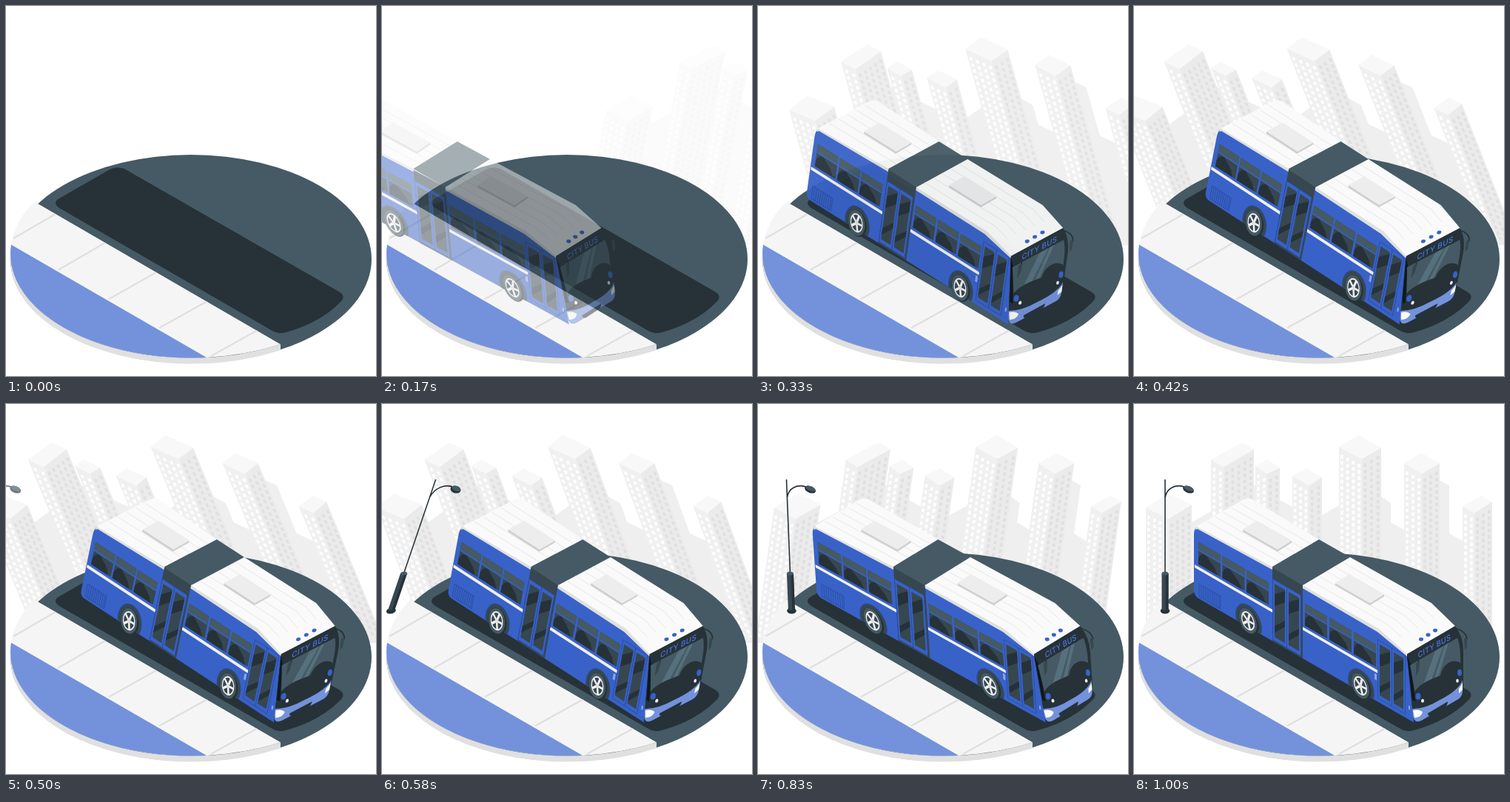
Recreate the animation shown at these times as an HTML page. Size 500 px wide and 500 px high, loop 1.04 s.

```html
<!DOCTYPE html>
<html lang="en">
<head>
<meta charset="utf-8">
<title>City bus</title>
<style>
html, body { margin: 0; width: 100%; height: 100%; overflow: hidden; background: #fff; }
svg { display: block; width: 100vw; height: 100vh; }
</style>
</head>
<body>
<svg viewBox="0 0 500 500">
  <defs>
    <clipPath id="slab"><ellipse cx="250" cy="334.5" rx="244" ry="141"/></clipPath>
    <clipPath id="curb"><path d="M0 242L371 457V500H0Z"/></clipPath>
    <clipPath id="sideClip"><path d="M0 0H300V99H0Z"/></clipPath>
  </defs>

  <g id="city"></g>

  <ellipse cx="250" cy="342" rx="244" ry="141" fill="#455a64"/>
  <path d="M160 220L450 386Q460 392 452 400Q425 428 378 441Q368 444 360 439L72 273Q62 266 72 260L140 221Q150 216 160 220Z" fill="#263238"/>
  <g clip-path="url(#curb)">
    <path d="M6 334.5A244 141 0 0 0 371 457V465A244 141 0 0 1 6 342Z" fill="#e0e0e0"/>
    <g clip-path="url(#slab)">
      <path d="M0 242L371 457V500H0Z" fill="#f5f5f5"/>
      <path d="M67 281L10 314M134 320L70 357M203 360L139 396M272 399L207 435M340 438L277 473" stroke="#e0e0e0" stroke-width="2.5"/>
      <path d="M0 318.5L271 475V500H0Z" fill="#7492db"/>
    </g>
  </g>

  <g id="lamp">
    <path d="M42 230V102M42 127C44 113 57 108 68 112" fill="none" stroke="#263238" stroke-width="1.6"/>
    <ellipse cx="73.500" cy="115.500" rx="7.800" ry="4.500" transform="rotate(22 73.5 115.5)" fill="#263238"/>
    <ellipse cx="74" cy="114.300" rx="6.800" ry="3" transform="rotate(22 74 114.3)" fill="#455a64"/>
    <ellipse cx="42" cy="279.500" rx="6.300" ry="4" fill="#263238"/>
    <path d="M37.500 229V277Q42 281 46.500 277V229Z" fill="#37474f"/>
    <path d="M43 230V279Q46 278 46.500 277V229Z" fill="#263238"/>
    <ellipse cx="42" cy="229" rx="4.500" ry="2.500" fill="#455a64"/>
  </g>

  <g id="bus">
    <!-- long side, sheared so that u runs along the bus and v runs down -->
    <g id="side" transform="matrix(1 .577 0 1 81 160)">
      <path d="M0 16Q0 6 6 4L249 1L288 12L297 99H5Q0 98 0 92Z" fill="#3862c8"/>
      <path d="M1 56.500H106V60.500H1ZM147 56.500H249V60.500H147Z" fill="#f0f0f0"/>
      <path d="M106 0H147V99H106Z" fill="#37474f"/>
    </g>
    <g id="roof"></g>
    <g id="front">
      <path d="M369 338L434 300Q445 314 445 335V386Q444 395 438 399L388 428Q378 432 377 420L369 342Z" fill="#263238"/>
      <path d="M369 340L376 400L380 402L374 352Z" fill="#0f181c"/>
      <path d="M373 353L437 316Q442 328 441 354Q428 374 380 391Z" fill="#455a64"/>
      <path d="M388 388L407 334L418 327L398 384ZM403 381L420 326L425 323L408 379Z" fill="#607d8b" opacity=".65"/>
      <path d="M379 389C388 376 402 372 414 367C418 349 432 344 441 350L442 362Q426 386 382 397Z" fill="#263238"/>
      <path d="M376 412Q394 412 413 400Q439 387 444 373V388Q444 395 438 399L388 428Q379 432 377 422Z" fill="#7492db"/>
      <path d="M397 418L424 402Q424 407 420 410L402 421Q397 423 397 418Z" fill="#263238"/>
      <path d="M377 414Q385 412 390 416Q389 423 379 424Z M439 385L444 377V386L439 391Z" fill="#fafafa"/>
      <g fill="#3862c8">
        <ellipse cx="384" cy="395" rx="3.500" ry="4.500"/><ellipse cx="440" cy="363" rx="3" ry="4.500"/>
        <ellipse cx="388" cy="318" rx="3" ry="2.400"/><ellipse cx="397.500" cy="312" rx="3" ry="2.400"/><ellipse cx="407" cy="306" rx="3" ry="2.400"/>
      </g>
      <ellipse cx="390" cy="401" rx="2" ry="2.600" fill="#f5f5f5"/>
      <ellipse cx="437" cy="374" rx="1.800" ry="2.600" fill="#f5f5f5"/>
      <text transform="matrix(.866 -.5 .08 1 384 343.500)" font-family="Inter, Arial, sans-serif" font-weight="500" font-size="10.500" textLength="" fill="#4b76e0" letter-spacing=".25">CITY BUS</text>
      <path d="M434 303Q449 307 450 318M371 342Q384 340 385 350" fill="none" stroke="#263238" stroke-width="1.800"/>
      <path d="M446 317L450 316V329L447 332ZM381 350L386 348L385 360L381 368Z" fill="#37474f"/>
    </g>
  </g>
</svg>

<script>
const el = id => document.getElementById(id);
const add = (id, markup) => el(id).insertAdjacentHTML('beforeend', markup);
const shape = (d, fill, more = '') => `<path d="${d}" fill="${fill}" ${more}/>`;
const line = (d, color, width, more = '') =>
  `<path d="${d}" fill="none" stroke="${color}" stroke-width="${width}" ${more}/>`;

// City: left corner, front corner, right corner, roof peak
const base = 323;
const towers = [
  [16, 140, 47, 155, 78, 136, 46, 121],
  [164, 84, 180, 94, 197, 86, 180, 75],
  [104, 75, 121, 85, 162, 61, 146, 52],
  [214, 97, 236, 110, 254, 99, 233, 87],
  [277, 58, 308, 74, 334, 59, 303, 42],
  [365, 80, 389, 94, 413, 80, 388, 66],
  [444, 138, 460, 147, 484, 132, 469, 124]
];

function windows(x1, y1, x2, y2, color) {
  const n = Math.max(2, Math.round((x2 - x1) / 7.5));
  let out = '';
  for (let i = 0; i < n; i++) {
    const k = (i + .5) / n;
    out += `M${x1 + (x2 - x1) * k} ${y1 + (y2 - y1) * k + 9}V${base - 8}`;
  }
  return line(out, color, 3.6, 'stroke-dasharray="4.6 3.8"');
}

add('city', shape(`M78 160L104 145V110H190V126L220 142V170L277 137V125H334L347 134V160L365 170V103H413L426 110V175L444 185V${base}H78Z`, '#efefef'));
for (const [ax, ay, bx, by, cx, cy, dx, dy] of towers) {
  add('city',
    shape(`M${ax} ${ay}L${bx} ${by}V${base}H${ax}Z`, '#f0f0f0') +
    shape(`M${bx} ${by}L${cx} ${cy}V${base}H${bx}Z`, '#ebebeb') +
    shape(`M${ax} ${ay}L${bx} ${by}L${cx} ${cy}L${dx} ${dy}Z`, '#f8f8f8') +
    windows(ax, ay, bx, by, '#fff') +
    windows(bx, by, cx, cy, '#e0e0e0'));
}

// Side of the bus
for (const u of [6, 38.5, 71, 150, 183, 216]) {
  add('side',
    shape(`M${u} 23H${u + 30}V53H${u}Z`, '#37474f') +
    shape(`M${u} 53V45Q${u + 4} 34 ${u + 11} 36L${u + 22} 45L${u + 26} 53Z`, '#263238') +
    shape(`M${u} 23H${u + 30}V34H${u}Z`, '#455a64') +
    line(`M${u} 34H${u + 30}`, '#3862c8', 1.8));
}
const door = (u, w, end) =>
  shape(`M${u - 1.5} 15H${u + w + 1.5}V${end + 2}H${u - 1.5}Z`, '#3862c8', 'stroke="#2b4c9e" stroke-width=".8"') +
  shape(`M${u + 1} 20H${u + w - 1}V${end - 3}H${u + 1}Z`, '#37474f') +
  shape(`M${u + 1} 34L${u + w - 1} 22V37L${u + 1} 50ZM${u + 1} 77L${u + w - 1} 62V70L${u + 1} 86Z`, '#263238');
add('side', door(108, 16, 95) + door(127, 16, 95) + door(250, 16, 92) + door(269, 15, 92));

let vent = 'M7 79H36V96H7Z';
for (let u = 10; u < 36; u += 3) vent += `M${u} 79V96`;
add('side', line(vent, '#2b4c9e', .8) +
  shape('M244 63H247V71H244ZM290 80H292V85H290Z', '#8ea8e6'));

const oval = (u, rx, ry, fill, v = 91) => `<ellipse cx="${u}" cy="${v}" rx="${rx}" ry="${ry}" fill="${fill}"/>`;
for (const u of [73, 225]) {
  let spokes = '';
  for (let i = 0; i < 5; i++) {
    const a = i * Math.PI * .4 - 1.3;
    spokes += `M${u} 91L${u + 8 * Math.cos(a)} ${91 + 11 * Math.sin(a)}`;
  }
  add('side',
    `<g clip-path="url(#sideClip)">${oval(u + 1, 18, 22, '#2b4c9e')}${oval(u + 1, 17, 21, '#37474f')}</g>` +
    oval(u + 1, 13.5, 16.5, '#263238') + oval(u, 12, 16, '#455a64') +
    oval(u, 9, 12, '#f0f0f0') + oval(u, 7.6, 10.2, '#37474f') +
    line(spokes, '#f5f5f5', 2.8) + oval(u, 2.4, 3, '#e0e0e0'));
}

// Roof
add('roof',
  shape('M83 170Q84 165 90 161L187 217V224L86 169ZM228 243L330 302L369 335V341L329 308L228 249Z', '#e0e0e0') +
  shape('M85 166Q86 163 92 161L148 129Q154 126 160 129L250 183L187 220Z', '#fafafa') +
  shape('M187 220L250 183L292 207L228 245Z', '#455a64') +
  shape('M228 245L292 207L402 269L434 300L369 338L331 304Z', '#fafafa'));
let seams = '';
for (let i = 1; i < 6; i++) {
  const k = i / 6;
  seams += `M${88 + 66 * k} ${165 - 37 * k}L${187 + 63 * k} ${220 - 37 * k}`;
  seams += `M${228 + 64 * k} ${245 - 38 * k}L${331 + 71 * k} ${304 - 35 * k}L${350 + 68 * k} ${321 - 36 * k}`;
}
add('roof', line(seams, '#e6e6e6', .9));
const hatch = (x, y) =>
  shape(`M${x} ${y}l47 27l19 -12v3l-19 12l-47 -27z`, '#cfcfcf') +
  shape(`M${x} ${y}l19 -12l47 27l-19 12z`, '#ededed');
add('roof', hatch(147, 169.5) + hatch(272, 242));

// Easing with overshoot: cubic bezier (.466, 0, .41, 1.45)
function ease(x) {
  if (x <= 0) return 0;
  if (x >= 1) return 1;
  const curve = (s, a, b) => 3 * (1 - s) ** 2 * s * a + 3 * (1 - s) * s * s * b + s ** 3;
  let lo = 0, hi = 1;
  for (let i = 0; i < 30; i++) {
    const mid = (lo + hi) / 2;
    if (curve(mid, .466, .41) < x) lo = mid; else hi = mid;
  }
  return curve(lo, 0, 1.45);
}
const smooth = x => x * x * (3 - 2 * x);

function track(t, keys, easing) {
  let i = 0;
  while (i < keys.length - 2 && t >= keys[i + 1][0]) i++;
  const [t0, a] = keys[i], [t1, b] = keys[i + 1];
  const x = Math.min(1, Math.max(0, (t - t0) / (t1 - t0)));
  return a + (b - a) * easing(x);
}

function place(id, dx, slope, cy, opacity) {
  el(id).setAttribute('transform', `matrix(1 0 ${slope} 1 ${dx - slope * cy} 0)`);
  el(id).setAttribute('opacity', Math.min(1, Math.max(0, opacity)));
}

const lean = [[0, 10], [.6, -10], [.8, 4.3], [1, 0]];
const lampLean = [[.42, .3], [.583, -.34], [.708, -.085], [.82, .04], [1, 0]];
const lampShift = [[.42, -120], [.583, 0]];
const start = performance.now();

function draw(now) {
  const ms = Math.max(0, now - start) % 1040;
  const t = Math.min(24, Math.floor((ms + 5) * .024)) / 24; // 24 steps a second
  const p = ease(t / .6);
  const slope = Math.tan(track(t, lean, ease) * Math.PI / 180);
  place('bus', -182 * (1 - p), slope, 279, Math.sqrt(p));
  place('city', 365 * (1 - p), -2 * slope, 182, p);
  place('lamp', track(t, lampShift, smooth), track(t, lampLean, smooth), 192, (t - .42) / .12);
  requestAnimationFrame(draw);
}
draw(start);
</script>
</body>
</html>
```
